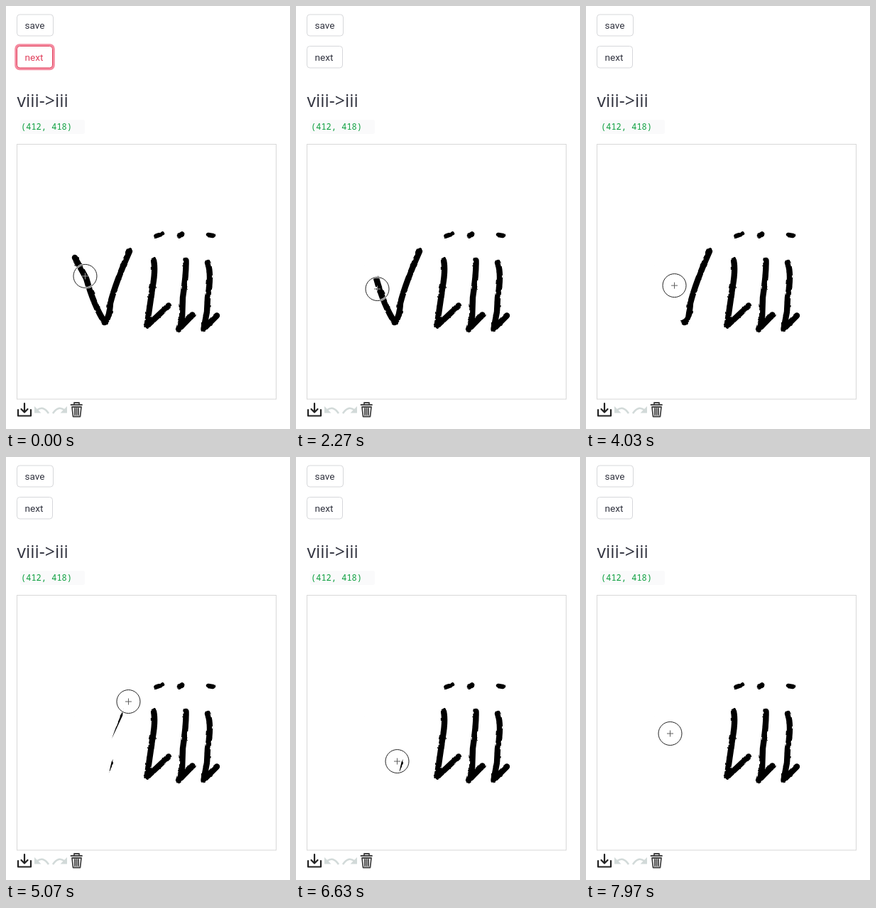
Recreate the animation shown at these times as an HTML page. Size 400x595 px, loop 8000 ms.

```html
<!DOCTYPE html>
<html lang="en">
<head>
<meta charset="utf-8">
<title>Eraser</title>
<style>
  html, body { margin: 0; width: 100%; height: 100%; overflow: hidden; background: #fff; }
  svg { display: block; width: 400px; height: 595px; isolation: isolate; }
  text { font: 13.6px Roboto, sans-serif; fill: #31333f; }
  .title { font: 24.8px "Open Sans", sans-serif; }
  .code { font: 12px "Noto Sans Mono", monospace; fill: #0c9f3e; }
  .button { fill: #fff; stroke: #d6d7da; }
  .line { fill: none; stroke-linecap: round; stroke-linejoin: round; }
  #focus text { fill: #e0405c; }
  #cross { mix-blend-mode: difference; }
</style>
</head>
<body>
<svg viewBox="0 0 400 595">
  <defs>
    <filter id="wobble" color-interpolation-filters="sRGB">
      <feTurbulence type="fractalNoise" baseFrequency="0.15" seed="4"/>
      <feDisplacementMap in="SourceGraphic" scale="3" xChannelSelector="R" yChannelSelector="G"/>
    </filter>
    <g id="turn">
      <path d="M3 6Q12 -2 20 10" fill="none" stroke="#d2dad9" stroke-width="2.6"/>
      <path d="M0 0V9.500H9.500Z" fill="#d2dad9"/>
    </g>
  </defs>
  <rect width="400" height="595" fill="#fff"/>

  <rect class="button" x="15.5" y="12" width="51" height="30" rx="4"/>
  <text x="26.5" y="32">save</text>
  <rect class="button" x="15.5" y="56.5" width="50" height="30.5" rx="4"/>
  <text x="26.5" y="77">next</text>
  <g id="focus">
    <rect x="14" y="55" width="53" height="33.5" rx="5" fill="#fff" stroke="#f58ba0" stroke-width="3.5"/>
    <rect x="15.5" y="56.5" width="50" height="30.5" rx="4" fill="#fff" stroke="#e0445f"/>
    <text x="26.5" y="77">next</text>
  </g>

  <text class="title" x="15.5" y="141.5">viii-&gt;iii</text>
  <rect x="20" y="160" width="91" height="20" rx="3" fill="#fafafb"/>
  <text class="code" x="21" y="174">(412, 418)</text>

  <!-- handwriting -->
  <g class="line" stroke="#000" stroke-width="8.4" filter="url(#wobble)">
    <path d="M97 354L113 383Q124 422 139 445Q146 438 147 418Q154 390 174 345"/>
    <path d="M208 358Q211 372 206 398L198.500 450L229 421.500"/>
    <path d="M253.500 358Q254 376 249 410L248 440L243 455L262.500 434.500"/>
    <path d="M284 361Q290 378 284 410L283 430L278.500 454L297 435.500"/>
    <path stroke-width="6.6" d="M211.500 323.500L220 320.500M244 323.500L248 320.500M285 322L291 323"/>
  </g>
  <polyline id="eraser" class="line" stroke="#fff" stroke-width="16"/>
  <rect x="15.5" y="194.5" width="365" height="358.5" fill="none" stroke="#d8d8d8"/>

  <!-- toolbar -->
  <path class="line" stroke="#222" stroke-width="2.2"
        d="M26 559V571M21.500 567L26 571.500L30.500 567M17 568V576.500H35V568"/>
  <use href="#turn" x="40" y="563"/>
  <use href="#turn" transform="translate(86 563) scale(-1 1)"/>
  <path class="line" stroke="#444" stroke-width="1.8"
        d="M91.500 561H107M96 560V558H103V560M93 564L94.500 577.500H104.500L106 564ZM97 566V575M99.500 566V575M102 566V575"/>

  <g id="cursor" fill="none">
    <circle r="16.5" stroke="#fff" stroke-width="2.4"/>
    <circle r="16.5" stroke="#222"/>
  </g>
  <path id="cross" d="M-4.500 0H4.500M0 -4.500V4.500" stroke="#a0a0a0" fill="none"/>
</svg>
<script>
const LOOP = 8000;
const ERASE_START = 1000;
const INK_LAG = 150; // the canvas trails the pointer slightly

// turning points of the pointer: time, x, y
const route = [
  [0, 111.5, 380], [800, 96.5, 347], [1000, 96.5, 347],
  [2120, 109, 375], [2270, 114.5, 398], [3300, 132.5, 434], [4030, 124.5, 393],
  [4360, 136, 448], [4480, 141, 426], [4640, 158, 396], [4780, 172, 366], [4910, 174, 345],
  [5070, 172.5, 344], [6500, 147, 410], [6630, 142.5, 428],
  [7000, 147, 446], [7550, 155, 430], [7970, 118.5, 389]
];

const [focus, eraser, cursor, cross] =
  ["focus", "eraser", "cursor", "cross"].map(id => document.getElementById(id));
const clamp = v => Math.min(1, Math.max(0, v));

function pointerAt(t) {
  const next = Math.max(1, route.findIndex(p => p[0] > t));
  const end = t >= route.at(-1)[0] ? route.length - 1 : next;
  const [t0, x0, y0] = route[end - 1];
  const [t1, x1, y1] = route[end];
  const k = clamp((t - t0) / (t1 - t0));
  return [x0 + (x1 - x0) * k, y0 + (y1 - y0) * k];
}

function erasedPath(t) {
  if (t <= ERASE_START) return "";
  const passed = route.filter(([at]) => at >= ERASE_START && at <= t);
  return [...passed.map(([, x, y]) => [x, y]), pointerAt(t)].join(" ");
}

function draw(t) {
  const place = `translate(${pointerAt(t)})`;
  cursor.setAttribute("transform", place);
  cross.setAttribute("transform", place);
  eraser.setAttribute("points", erasedPath(t - INK_LAG));
  focus.setAttribute("opacity", 1 - clamp((t - 800) / 150));
}

const start = performance.now();
function tick() {
  draw((performance.now() - start) % LOOP);
  requestAnimationFrame(tick);
}
tick();
</script>
</body>
</html>
```
